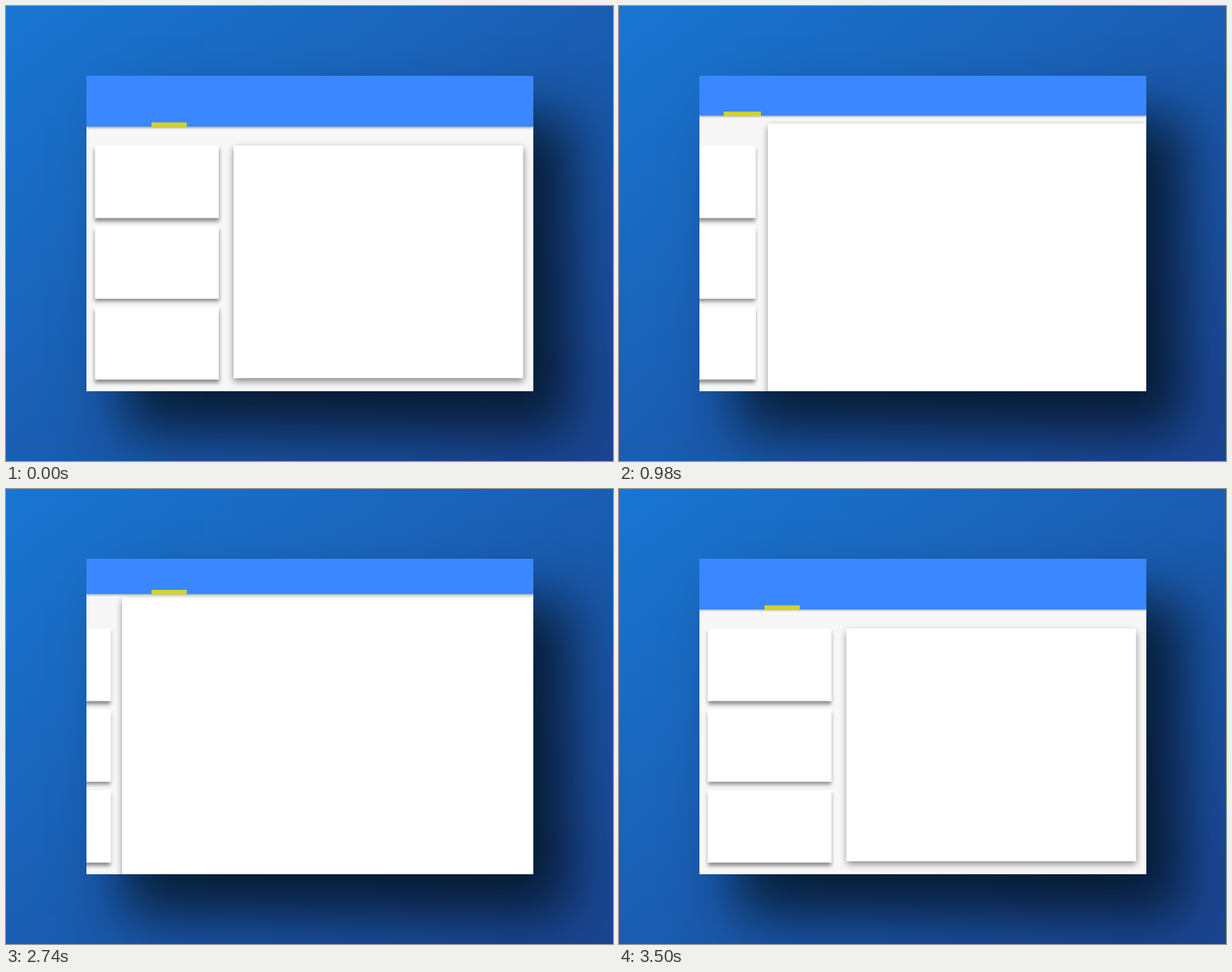
Animation of 800 by 600 pixels, one loop 3.52 s. Source, as an HTML page with a canvas:

```html
<!DOCTYPE html>
<html lang="en">
<head>
<meta charset="utf-8">
<title>Expanding panel</title>
<style>
  html, body { margin: 0; width: 100%; height: 100%; overflow: hidden; }
  canvas { display: block; }
</style>
</head>
<body>
<canvas id="stage" width="800" height="600"></canvas>
<script>
const ctx = document.getElementById('stage').getContext('2d');
const LOOP = 3520;
const WIN = { x: 106, y: 92, w: 589, h: 416 };

// [ms, how far the panel is open]
const OPENING = [
  [0, 0], [500, 0], [740, 0.004], [820, 0.03], [880, 0.14], [940, 0.36],
  [980, 0.505], [1020, 0.54], [1060, 0.67], [1120, 0.84], [1200, 0.955],
  [1300, 0.99], [1460, 1], [2460, 1], [2560, 0.988], [2640, 0.92],
  [2740, 0.72], [2800, 0.5], [2860, 0.29], [2920, 0.145], [2980, 0.055],
  [3040, 0.008], [3500, 0.002], [LOOP, 0]
];

const lerp = (a, b, p) => a + (b - a) * p;
const ramp = (t, from, to) => Math.min(1, Math.max(0, (t - from) / (to - from)));

// Monotone cubic interpolation through the keys
function sample(keys, t) {
  const slope = i => keys[i + 1]
    ? (keys[i + 1][1] - keys[i][1]) / (keys[i + 1][0] - keys[i][0]) : 0;
  const tangent = i => {
    if (i === 0) return 0;
    const a = slope(i - 1), b = slope(i);
    return a * b > 0 ? 2 * a * b / (a + b) : 0;
  };
  let i = 0;
  while (i < keys.length - 2 && t >= keys[i + 1][0]) i++;
  const [t0, v0] = keys[i], [t1, v1] = keys[i + 1];
  const d = t1 - t0, u = (t - t0) / d, w = 1 - u;
  return v0 * (1 + 2 * u) * w * w + v1 * (3 - 2 * u) * u * u
    + d * u * w * (tangent(i) * w - tangent(i + 1) * u);
}

function box(x, y, w, h, color, shadow) {
  ctx.save();
  if (shadow) {
    ctx.shadowOffsetX = shadow.x || 0;
    ctx.shadowOffsetY = shadow.y;
    ctx.shadowBlur = shadow.blur;
    ctx.shadowColor = shadow.color;
  }
  ctx.fillStyle = color;
  ctx.fillRect(x, y, w, h);
  ctx.restore();
}

function drawBackdrop() {
  // Gradient line perpendicular to the other diagonal
  const g = ctx.createLinearGradient(112, -84, 688, 684);
  g.addColorStop(0, '#1976d2');
  g.addColorStop(1, '#1b4592');
  box(0, 0, 800, 600, g);
  box(WIN.x, WIN.y, WIN.w, WIN.h, '#f7f7f7',
    { x: 48, y: 54, blur: 70, color: 'rgba(0,10,18,0.76)' });
}

function drawCards(p) {
  const x = 117.2 - 198 * p;
  for (let i = 0; i < 3; i++) {
    box(x, 184 + i * 106.5, 163.3, 95.6, '#fff',
      { y: 4, blur: 5, color: 'rgba(0,0,0,0.45)' });
  }
}

function drawPanel(p) {
  const x = lerp(300, 95, p), y = lerp(184, 127, p);
  const right = lerp(681.5, 707, p), bottom = lerp(490.7, 568, p);
  box(x, y, right - x, bottom - y, '#fff',
    { y: 4, blur: 9, color: 'rgba(0,0,0,0.46)' });
}

function drawTab(x, w, bottom, alpha) {
  ctx.globalAlpha = alpha;
  ctx.fillStyle = '#d0d428';
  ctx.beginPath();
  ctx.roundRect(x, bottom - 6, w, 6, 0.8);
  ctx.fill();
  ctx.globalAlpha = 1;
}

function drawHeader(t, p) {
  const bottom = lerp(159, 130.3, p);
  box(WIN.x, WIN.y, WIN.w, bottom - WIN.y, '#3b87ff',
    { y: 1.5, blur: 3, color: 'rgba(0,0,0,0.4)' });
  const back = t >= 2460;
  const homeAlpha = back ? ramp(t, 2560, 2740) : 1 - ramp(t, 490, 680);
  const openAlpha = back ? 1 - ramp(t, 2450, 2600) : ramp(t, 650, 850);
  drawTab(191.7, 46.6, bottom + 0.6, homeAlpha);
  drawTab(138, 49, bottom + 0.9, openAlpha);
}

function draw(t) {
  const p = sample(OPENING, t);
  drawBackdrop();
  ctx.save();
  ctx.beginPath();
  ctx.rect(WIN.x, WIN.y, WIN.w, WIN.h);
  ctx.clip();
  drawCards(p);
  drawPanel(p);
  drawHeader(t, p);
  ctx.restore();
}

const start = performance.now();
function tick() {
  draw((performance.now() - start) % LOOP);
  requestAnimationFrame(tick);
}
tick();
</script>
</body>
</html>
```
